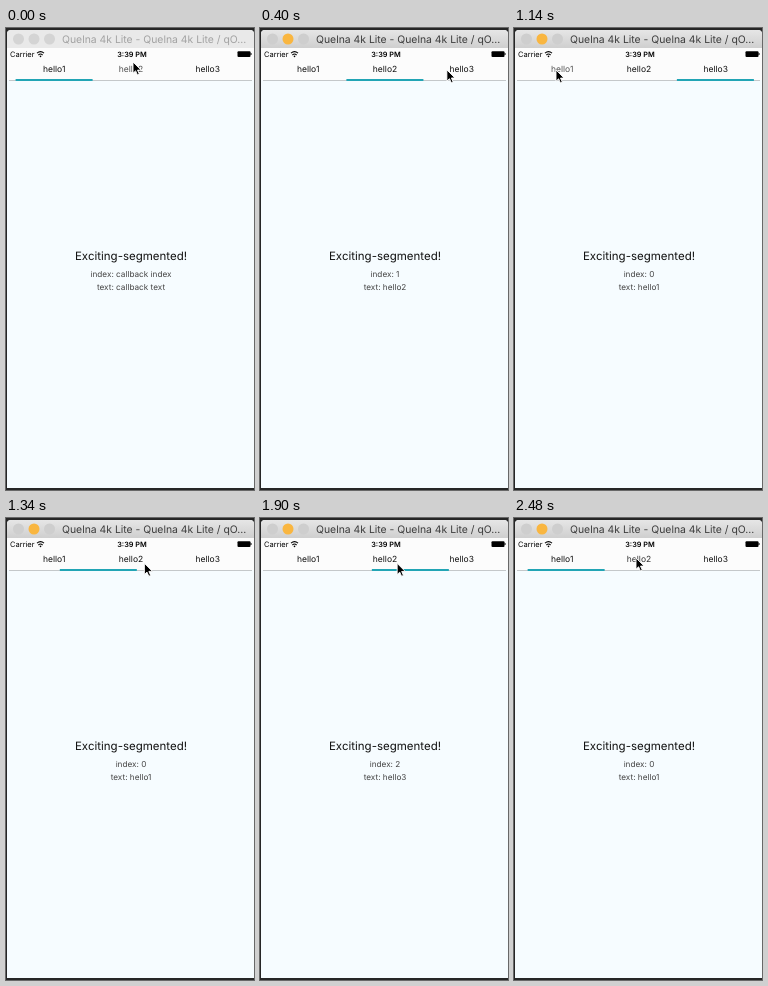
An HTML page for the animation above (2500 ms loop, 248 by 462 pixels).

```html
<!DOCTYPE html>
<html lang="en">
<meta charset="utf-8">
<title>Segmented tabs</title>
<style>
  html, body { margin: 0; width: 100%; height: 100%; overflow: hidden; background: #262626; }
  svg { display: block; width: 248px; height: 462px; font-family: Inter, sans-serif; }
  .mid { text-anchor: middle; }
  .tab { font-size: 8.5px; fill: #111; }
  .note { font-size: 8.2px; fill: #444; }
</style>
<svg viewBox="0 0 248 462" text-rendering="geometricPrecision">
  <defs>
    <linearGradient id="chrome" x2="0" y2="1">
      <stop stop-color="#e6e6e6"/><stop offset="1" stop-color="#cfcfcf"/>
    </linearGradient>
  </defs>
  <path d="M1 460V6q0-4 4-4h239q4 0 4 4v454z" fill="#f6fcff"/>
  <path id="bar" d="M1 20V6q0-4 4-4h239q4 0 4 4v14z"/>
  <g id="lights">
    <circle cx="12.5" cy="11" r="5.5"/><circle cx="28" cy="11" r="5.5"/><circle cx="43.5" cy="11" r="5.5"/>
  </g>
  <text id="title" x="56" y="15" font-size="10.4">Quelna 4k Lite - Quelna 4k Lite / qO...</text>

  <path d="M1 20h247v32H1z" fill="#fcfcfc"/>
  <path d="M3 52.5h243" stroke="#c4c8ca"/>
  <text x="4" y="29" font-size="7.5">Carrier</text>
  <g fill="none" stroke="#000" stroke-width="1.1">
    <path d="M31 25.2q3.5-3.2 7 0M32.4 27q2.1-1.9 4.2 0"/>
  </g>
  <circle cx="34.5" cy="28.4" r=".8"/>
  <text class="mid" x="126" y="29" font-size="7.3" font-weight="600">3:39 PM</text>
  <rect x="231.5" y="23.2" width="13" height="5.8" rx="1"/>
  <path d="M244.5 25h1v2h-1z"/>

  <text class="mid tab" x="48.2" y="43.5">hello1</text>
  <text class="mid tab" x="125" y="43.5">hello2</text>
  <text class="mid tab" x="201.7" y="43.5">hello3</text>
  <rect id="line" y="51" width="77" height="2" fill="#22a5b5"/>

  <text class="mid" x="125" y="232" font-size="11.5" fill="#111">Exciting-segmented!</text>
  <text class="mid note" id="index" x="125" y="248.7"></text>
  <text class="mid note" id="label" x="125" y="261.7"></text>
  <path id="cursor" d="M0 0v11.2l2.6-2.4 1.8 4.1 1.9-.8-1.8-4h3.6z" stroke="#fff" stroke-width=".9"/>
</svg>
<script>
  const LOOP = 2500, SLIDE = 340;
  const $ = id => document.getElementById(id);
  const tabs = [...document.querySelectorAll('.tab')];
  const lights = [...$('lights').children];

  // [time, tab]
  const taps = [[20, 1], [640, 2], [1130, 0], [1700, 2], [2180, 0]];
  // [start, end, x0, y0, x1, y1]
  const moves = [
    [80, 520, 127, 34, 200, 41], [616, 1100, 200, 41, 42, 42], [1170, 1480, 42, 42, 209, 41],
    [1700, 2140, 209, 41, 44, 42], [2220, 2480, 44, 42, 122, 40]
  ];

  const clamp = v => Math.max(0, Math.min(1, v));
  const mix = (a, b, p) => a + (b - a) * p;
  const quad = p => p < .5 ? 2 * p * p : 1 - 2 * (1 - p) ** 2;
  const smooth = p => p * p * (3 - 2 * p);
  const tabX = i => 9.6 + 76.8 * i;

  // Opacity of a pressed tab, by time since the tap
  const dip = d => mix(.6, 1, clamp(d < 0 ? -d / 60 : d / 40));

  function draw(t) {
    let x = tabX(0), current = -1;
    const fade = [1, 1, 1];
    for (const [time, tab] of taps) {
      const d = (t - time + 60 + LOOP) % LOOP - 60;
      fade[tab] = Math.min(fade[tab], dip(d));
      if (t < time) continue;
      current = tab;
      x = mix(x, tabX(tab), quad(clamp((t - time) / SLIDE)));
    }
    tabs.forEach((el, i) => el.setAttribute('opacity', fade[i]));
    $('line').setAttribute('x', x);
    $('index').textContent = 'index: ' + (current < 0 ? 'callback index' : current);
    $('label').textContent = 'text: ' + (current < 0 ? 'callback text' : 'hello' + (current + 1));

    const active = current >= 0;
    $('bar').setAttribute('fill', active ? 'url(#chrome)' : '#e9e9e9');
    $('title').setAttribute('fill', active ? '#3c3c3c' : '#a2a2a2');
    lights.forEach((el, i) => el.setAttribute('fill', !active ? '#d4d4d4' : i === 1 ? '#f9b640' : '#cecece'));

    const [start, end, x0, y0, x1, y1] = moves.findLast(m => t >= m[0]) || moves[0];
    const p = smooth(clamp((t - start) / (end - start)));
    const y = mix(y0, y1, p) + 4 * Math.sin(Math.PI * p);
    $('cursor').setAttribute('transform', `translate(${mix(x0, x1, p)} ${y})`);
  }

  const begin = performance.now();
  function tick() {
    draw((performance.now() - begin) % LOOP);
    requestAnimationFrame(tick);
  }
  tick();
</script>
</html>
```
